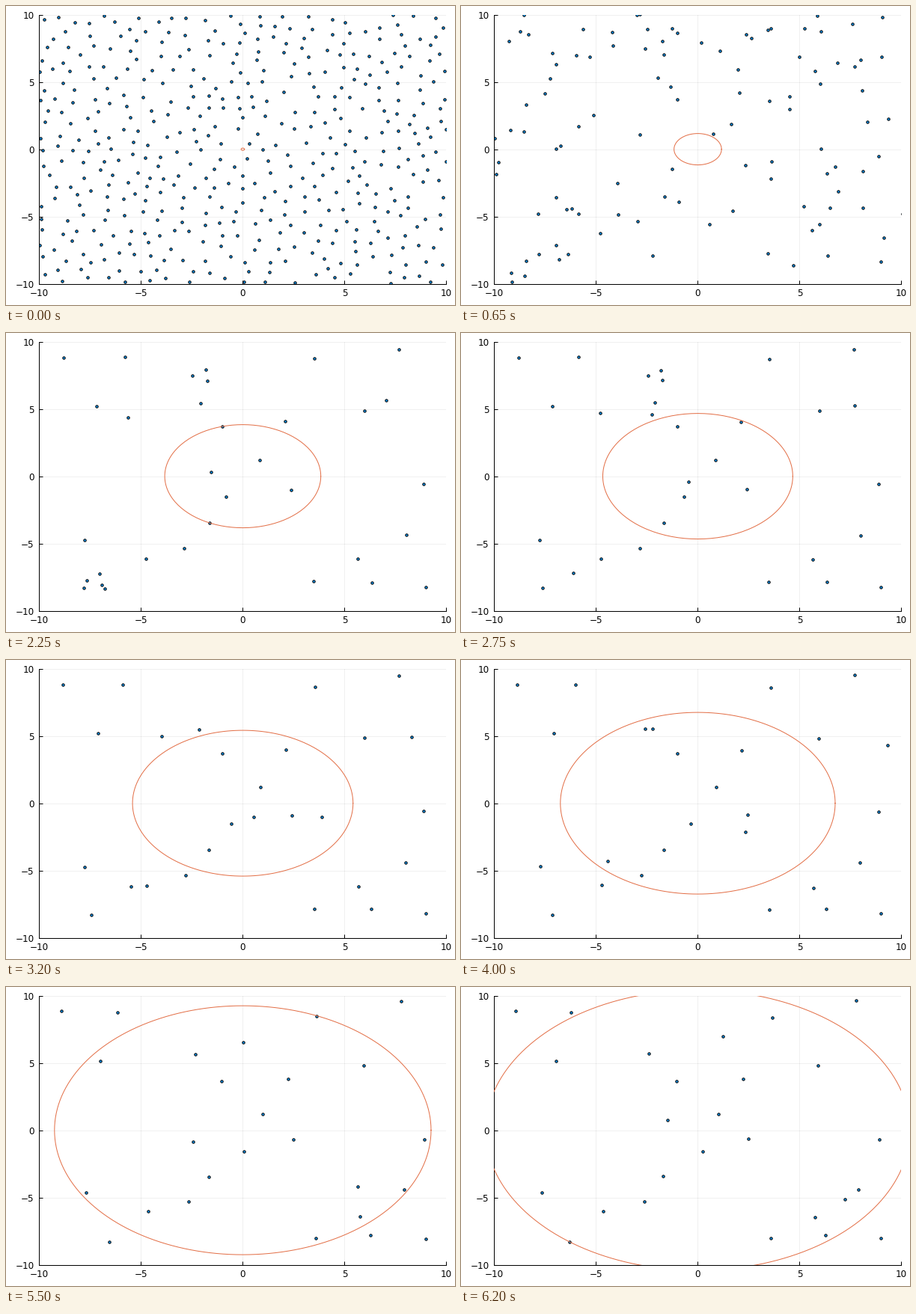
A matplotlib script for the animation above (6.25 s loop, 600 by 400 pixels).

```python
import numpy as np
import matplotlib.pyplot as plt
from matplotlib.animation import FuncAnimation

FRAMES, INTERVAL = 125, 50
DPI = 100
PX = 72 / DPI                 # one pixel in points
TOTAL, DRIFTERS = 450, 22
KICK_SPEED = 1.42             # units per step after a collision

# Long straight runs: x, y, then velocity per step
RUNNERS = [(-9.58, 2.85, .0873, .0335), (-6.57, 3.41, .1112, -.0691),
           (4.14, 7.37, .0647, -.0384), (-9.77, -13.57, .0667, .1157),
           (-1.42, -1.46, .0133, -.0011), (-8.69, -8.32, .0193, 0)]

# Small groups that collide late: centre, step, members
GROUPS = [(4.5, 3.45, 34, 2), (7.3, 6.3, 36, 2),
          (-7.2, -7.7, 46, 3), (-2.0, 7.5, 57, 3)]

rng = np.random.default_rng(12)


def polar(angle, radius):
    return np.column_stack([np.cos(angle), np.sin(angle)]) * radius


def scatter(taken, count, gap):
    """Random points in the square that keep a gap to all others."""
    pts = list(taken)
    while len(pts) < len(taken) + count:
        p = rng.uniform(-10, 10, 2)
        if np.min(np.hypot(*(np.array(pts) - p).T)) > gap:
            pts.append(p)
    return np.array(pts[len(taken):])


def runners():
    data = np.array(RUNNERS)
    n = len(data)
    return data[:, :2], data[:, 2:], np.full(n, np.inf), np.zeros((n, 2))


def group(x, y, step, n):
    """Dots on a small circle that fly apart at the given step."""
    angle = rng.uniform(0, 2 * np.pi) + 2 * np.pi * np.arange(n) / n
    start = polar(angle, 0.2 + 0.15 * n) + (x, y)
    return (start, polar(angle, -0.004), np.full(n, step),
            polar(angle, KICK_SPEED))


def drifters(taken):
    start = scatter(taken, DRIFTERS, 1.7)
    vel = rng.normal(0, 0.0025, start.shape)
    return start, vel, np.full(DRIFTERS, np.inf), np.zeros_like(start)


def crowd(taken):
    """Closely packed dots that are knocked outwards in the first steps."""
    n = TOTAL - len(taken)
    start = scatter(taken, n, 0.66)
    angle = np.arctan2(start[:, 1], start[:, 0]) + rng.normal(0, 0.8, n)
    burst = np.minimum(rng.exponential(4.5, n), 13)
    return (start, rng.normal(0, 0.02, (n, 2)), burst,
            polar(angle, KICK_SPEED))


parts = [runners()] + [group(*g) for g in GROUPS]
for fill in (drifters, crowd):
    parts.append(fill(np.vstack([p[0] for p in parts])))
start, vel, burst, kick = (np.concatenate(col) for col in zip(*parts))
burst = burst[:, None]

fig = plt.figure(figsize=(6, 4), dpi=DPI, facecolor="white")
ax = fig.add_axes([44.4 / 600, 28.4 / 400, 544 / 600, 360 / 400])
ax.set(xlim=(-10, 10), ylim=(-10, 10),
       xticks=range(-10, 11, 5), yticks=range(-10, 11, 5))
ax.set_axisbelow(True)
ax.grid(color="black", alpha=0.06, lw=PX)
ax.spines[["top", "right"]].set_visible(False)
ax.spines[["left", "bottom"]].set_linewidth(PX)
ax.tick_params(direction="in", length=5 * PX, width=PX,
               labelsize=12 * PX, labelfontfamily="DejaVu Sans")
ax.tick_params(axis="x", pad=6 * PX)
ax.tick_params(axis="y", pad=7 * PX)

dots = ax.scatter(*start.T, s=(3.4 * PX) ** 2, facecolor="#009afa",
                  edgecolor="black", linewidth=PX, zorder=2)
ring, = ax.plot([], [], color="#e36f47", lw=PX, zorder=3)
circle = polar(np.linspace(0, 2 * np.pi, 181), 1)


def draw(n):
    dots.set_offsets(start + vel * np.minimum(n, burst)
                     + kick * np.maximum(n - burst, 0))
    ring.set_data(*(circle * (n + 1) / 12).T)
    return dots, ring


anim = FuncAnimation(fig, draw, frames=FRAMES, interval=INTERVAL,
                     repeat=True, repeat_delay=0)
plt.show()
```
